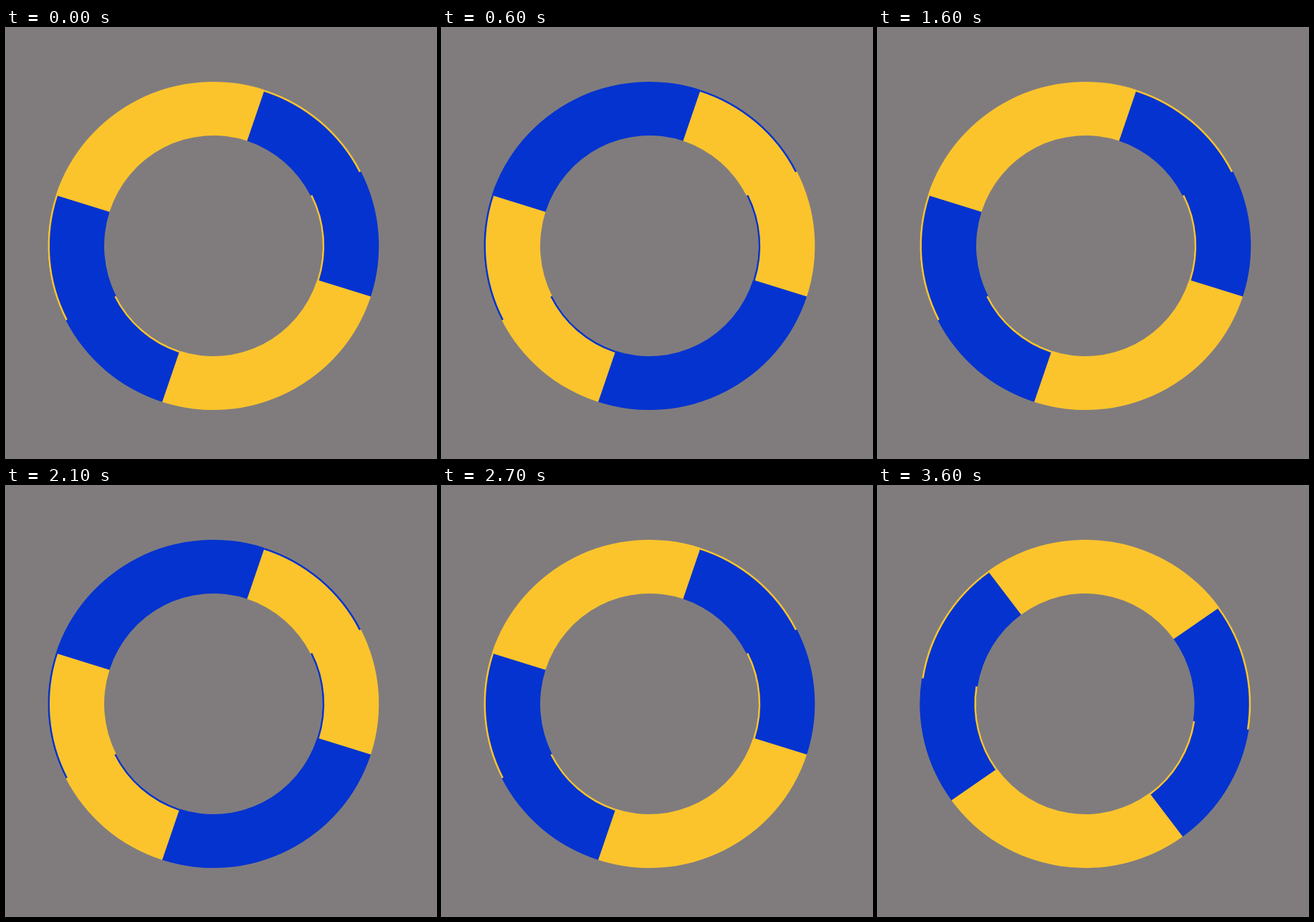
These frames come from a looping animation (600 by 600 pixels, 3700 ms). An HTML page with a canvas:

```html
<!DOCTYPE html>
<html lang="en">
<head>
<meta charset="utf-8">
<title>Four-stroke ring</title>
<style>
  html, body { margin: 0; width: 100%; height: 100%; overflow: hidden; background: #807c7e; }
  canvas { display: block; width: 600px; height: 600px; }
</style>
</head>
<body>
<canvas id="stage" width="600" height="600"></canvas>
<script>
  const ctx = document.getElementById('stage').getContext('2d');
  const GREY = '#807c7e', BLUE = '#0433cf', YELLOW = '#fbc42d';
  const CX = 289.3, CY = 304;
  const OUTER = [231, 229], INNER = [152.3, 154];
  const RIM = 2.6;
  const STEP = 100, FRAMES = 37, SKIP = 18;

  const inset = ([x, y], d) => [x + d, y + d];
  const rad = deg => (deg - 90) * Math.PI / 180;

  // Angles run clockwise from the top, in degrees.
  function band(outer, inner, from, to, color) {
    ctx.beginPath();
    ctx.ellipse(CX, CY, ...outer, 0, rad(from), rad(to));
    ctx.ellipse(CX, CY, ...inner, 0, rad(to), rad(from), true);
    ctx.closePath();
    ctx.fillStyle = color;
    ctx.fill();
  }

  const outerRim = (from, color) => band(OUTER, inset(OUTER, -RIM), from, from + 45, color);
  const innerRim = (from, color) => band(inset(INNER, RIM), INNER, from, from + 45, color);

  // Four strokes: two poses, then the same two with the colours swapped.
  function draw(stroke) {
    const turn = stroke % 2 ? 54 : 18;
    const [side, cap] = stroke < 2 ? [BLUE, YELLOW] : [YELLOW, BLUE];
    ctx.fillStyle = GREY;
    ctx.fillRect(0, 0, 600, 600);
    for (let i = 0; i < 4; i++) {
      const from = turn + i * 90;
      band(OUTER, INNER, from, from + 90, i % 2 ? cap : side);
    }
    outerRim(turn, cap);
    innerRim(turn + 45, cap);
    innerRim(turn + 180, cap);
    outerRim(turn + 225, cap);
  }

  function tick() {
    const frame = Math.floor(performance.now() / STEP) % FRAMES;
    draw((frame + (frame >= SKIP ? 1 : 0)) % 4);
    requestAnimationFrame(tick);
  }
  tick();
</script>
</body>
</html>
```
